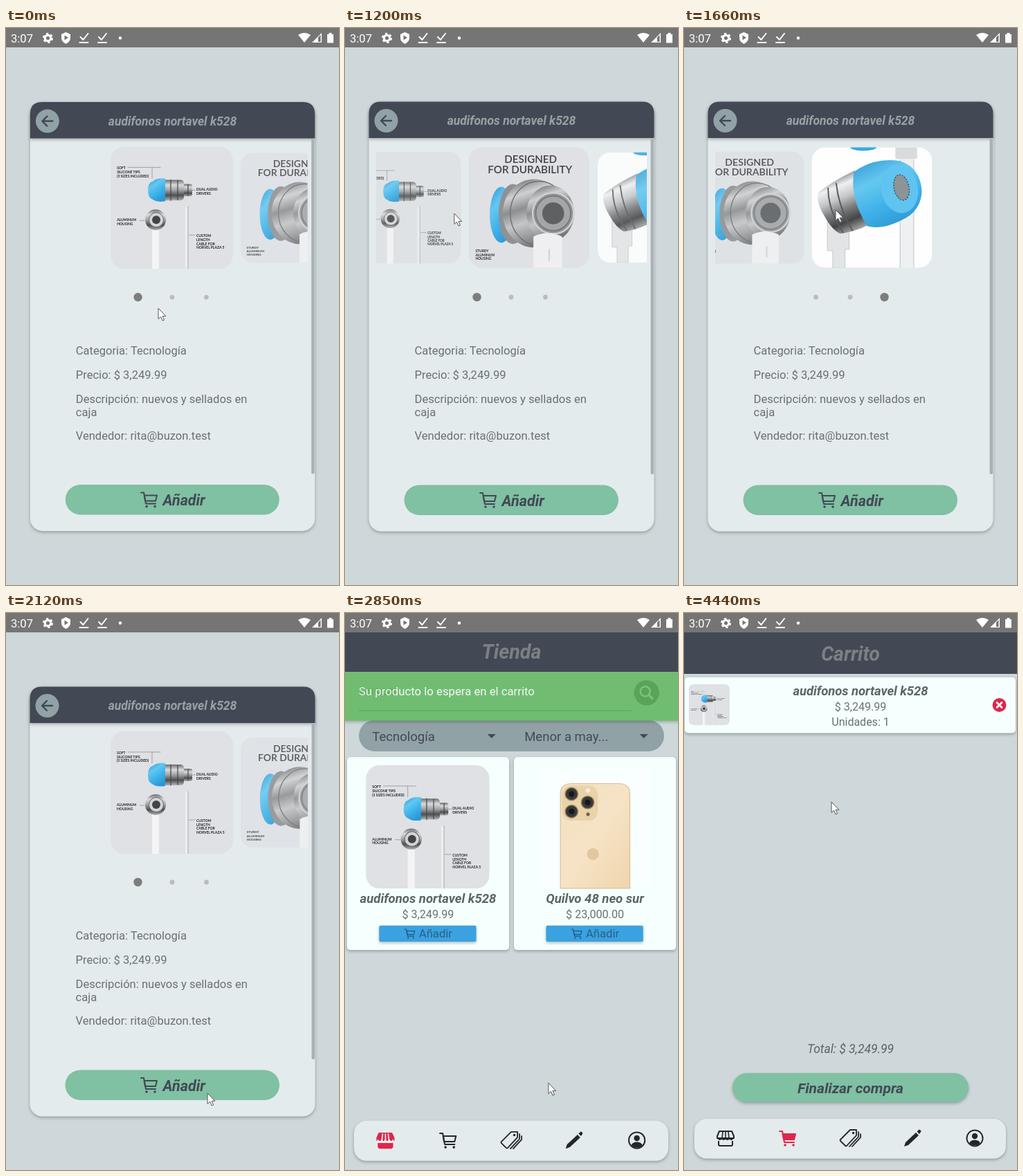
An HTML page that plays this animation: 481 by 805 pixels, repeating every 4.51 s.

```html
<!DOCTYPE html>
<html lang="es">
<head>
<meta charset="utf-8">
<style>
html, body { margin: 0; width: 100%; height: 100%; overflow: hidden; background: #ced7d9; }
svg { display: block; width: 100vw; height: 100vh; }
text { font-family: Roboto, sans-serif; white-space: pre; }
.bi { font-weight: 700; font-style: italic; }
.mid { text-anchor: middle; }
.tiny { font: 700 5px Lato, sans-serif; fill: #222; }
.ad { font: 600 15.4px Lato, sans-serif; fill: #3e3e42; text-anchor: middle; }
.sh { filter: drop-shadow(0 2px 2px #0004); }
</style>
</head>
<body>
<script>
const LOOP = 4510, STEP = 66.32;
const PRODUCT = 'audifonos nortavel k528', PRICE = '$ 3,249.99';
const DARK = '#424954', GREY = '#6a7074', PANEL = '#e4ebec', PILL = '#91a2a6', MINT = '#80c0a3', RED = '#e0264a', WHITE = '#f5fffd';

const text = (x, y, size, fill, str, cls = '') =>
  `<text x="${x}" y="${y}" font-size="${size}" fill="${fill}" class="${cls}">${str}</text>`;
const rect = (x, y, w, h, r, fill, cls = '') =>
  `<rect x="${x}" y="${y}" width="${w}" height="${h}" rx="${r}" fill="${fill}" class="${cls}"/>`;
const circle = (x, y, r, fill, more = '') => `<circle cx="${x}" cy="${y}" r="${r}" fill="${fill}" ${more}/>`;
const oval = (x, y, rx, ry, fill, more = '') => `<ellipse cx="${x}" cy="${y}" rx="${rx}" ry="${ry}" fill="${fill}" ${more}/>`;
const path = (d, fill, more = '') => `<path d="${d}" fill="${fill}" ${more}/>`;
const line = (d, color, width = 1) => path(d, 'none', `stroke="${color}" stroke-width="${width}" stroke-linecap="round" stroke-linejoin="round"`);
const notes = (x, y, ...rows) => rows.map((s, i) => `<text x="${x}" y="${y + i * 5.7}" class="tiny">${s}</text>`).join('');
const use = (id, x, y, s = 1) => `<use href="#${id}" transform="translate(${x} ${y}) scale(${s})"/>`;
const grad = (id, dir, ...stops) => `<linearGradient id="${id}" ${dir}>` +
  stops.map((c, i) => `<stop offset="${i / (stops.length - 1)}" stop-color="${c}"/>`).join('') + '</linearGradient>';

// Icons are drawn around their own centre.
const icons = {
  cart: (c, fill = 'none') => line('M-12 -10H-8L-5 6H9', c, 2) +
    path('M-7.4 -6H11L9 2H-6Z', fill, `stroke="${c}" stroke-width="2" stroke-linejoin="round"`) +
    circle(-4, 10, 1.8, c) + circle(8, 10, 1.8, c),
  store: (c, fill) => path('M-9 -10H9L12 -3V0H-12V-3Z', fill, `stroke="${c}" stroke-width="2" stroke-linejoin="round"`) +
    line('M-4 -9L-5 0M4 -9L5 0M0 -9V0', fill === 'none' ? c : WHITE, 1.6) +
    line('M-11 0q2.7 4 5.5 0q2.7 4 5.5 0q2.7 4 5.5 0q2.7 4 5.5 0', fill === 'none' ? c : WHITE, 1.8) +
    path('M-10 4V9Q-10 11 -8 11H8Q10 11 10 9V4', fill, `stroke="${c}" stroke-width="2"`),
  tags: c => line('M-14 2L0 -12H9V-4L-5 11Q-6 12 -7 11L-14 4Q-15 3 -14 2ZM12 -9V-2L-1 12M15 -6V-1L3 12', c, 1.8) + circle(4.5, -7.5, 1.7, c),
  pencil: c => path('M-12 12L-10 6L5 -8L9 -4L-6 10ZM6.5 -9.5L9 -12Q10 -13 11.5 -11.5Q13 -10 12 -9L10 -6Z', c),
  person: c => circle(0, 0, 11.5, 'none', `stroke="${c}" stroke-width="2"`) + circle(0, -3, 4.2, c) +
    path('M-8 7Q-6 2.5 0 2.5T8 7Q5 10.5 0 10.5T-8 7Z', c)
};
const icon = (name, x, y, s, ...args) => `<g transform="translate(${x} ${y}) scale(${s})">${icons[name](...args)}</g>`;

const defs = `<defs>
${grad('metal', 'x1="0" y1="0" x2="0" y2="1"', '#6c6e70', '#d9dadb', '#a0a2a4', '#4d4f51', '#b0b2b4')}
${grad('steel', 'x1=".3" y1="0" x2=".6" y2="1"', '#77797b', '#cfd0d1', '#8b8d8f', '#c4c5c6', '#98999b', '#646668')}
${grad('barrel', 'x1=".2" y1=".1" x2=".55" y2="1"', '#6f7173', '#f0f0f1', '#c5c6c8', '#77797b', '#3f4143', '#a6a8aa')}
${grad('blue', 'x1=".1" y1="0" x2=".6" y2="1"', '#2f9bd6', '#63c7f2', '#3cb2ea', '#2b98d4')}
${grad('gold', 'x1="0" y1="0" x2="1" y2="1"', '#f4dfbf', '#f6e3c6', '#efd5ab')}
<clipPath id="round"><rect width="177" height="177" rx="20"/></clipPath>
<clipPath id="window"><rect x="45" y="160" width="391" height="200"/></clipPath>
<g id="slide0" clip-path="url(#round)">${rect(0, 0, 177, 177, 0, '#dfe1e5')}
  ${notes(9, 33, 'SOFT', 'SILICONE TIPS', '(3 SIZES INCLUDED)')}${line('M25 30H72M60 30V46M117 63H123M42 107H49M111 128H122', '#777', .6)}
  ${rect(101, 54, 17, 18, 3, 'url(#metal)')}${rect(74, 48, 32, 30, 5, 'url(#metal)')}${line('M87 48V78M97 49V77M112 55V71', '#444', 1.2)}
  ${path('M79 46V79Q66 81 60 76Q54 74 54 63Q54 52 61 50Q67 45 79 46Z', 'url(#blue)')}
  ${notes(124, 64, 'DUAL AUDIO', 'DRIVERS')}${notes(9, 108, 'ALUMINUM', 'HOUSING')}
  ${rect(60, 112, 10, 70, 3, '#f4f4f6')}${circle(65, 106, 15, 'url(#metal)')}${circle(66, 106, 10.5, '#d4d5d6', 'stroke="#666"')}${circle(66, 106, 6, '#444')}
  ${rect(108, 87, 5, 90, 2, '#eeeef1')}${line('M112 87V177', '#999', .9)}
  ${notes(124, 131, 'CUSTOM', 'LENGTH', 'CABLE FOR', 'NORVEL PLAZA 5')}</g>
<g id="slide1" clip-path="url(#round)">${rect(0, 0, 177, 177, 0, '#dfe1e5')}
  <text x="91" y="23" class="ad">DESIGNED</text><text x="90" y="38" class="ad">FOR DURABILITY</text>
  ${oval(48, 99, 17, 41, 'url(#blue)')}${oval(65, 98, 21, 44, '#8d8f91')}
  ${oval(96, 97, 46, 50, 'url(#steel)')}${oval(103, 97, 42, 47, 'none', 'stroke="#6d6f71" stroke-width="1.5"')}
  ${oval(120, 97, 35, 41, 'url(#steel)')}${circle(124, 97, 30, '#8f9193', 'stroke="#cfd0d1" stroke-width="2.5"')}
  ${circle(124, 97, 25.5, '#a2a4a6', 'stroke="#6f7173" stroke-width="1.5"')}${circle(124, 97, 16, '#5b5d5f')}
  ${path('M95 131Q115 121 137 131V177H95Z', '#f0f0f2')}${line('M118 150V166', '#d0d0d2', 2)}
  ${notes(10, 154, 'STURDY', 'ALUMINUM', 'HOUSING')}</g>
<g id="slide2" clip-path="url(#round)">${rect(0, 0, 177, 177, 0, '#fff')}
  ${rect(130, 0, 20, 177, 0, '#f0f1f2')}${line('M130 18V177M150 18V177', '#c5c7c9', 1.2)}${rect(123, 0, 32, 17, 2, '#d9dadc')}
  ${oval(76, 0, 19, 5, '#35a8e2')}
  ${path('M23 102H55V150H49V177H31V152H23Z', '#e3e4e6', 'stroke="#c5c7c9"')}
  ${path('M10 66Q30 50 63 34L94 108Q68 124 42 127Q30 122 18 100Q5 78 10 66Z', 'url(#barrel)')}
  ${line('M24 60Q24 92 46 125M36 53Q40 90 60 122', '#55575a', 2)}
  ${path('M62 36Q92 14 130 20Q160 30 162 65Q160 92 138 104Q105 122 82 116Q56 76 62 36Z', 'url(#blue)')}
  ${oval(129, 61, 27, 36, '#5cc3f0', 'transform="rotate(-12 129 61)"')}
  ${oval(132, 59, 11, 19, '#8a9296', 'stroke="#3d4a50" stroke-width="1.5" stroke-dasharray="2 2" transform="rotate(-12 132 59)"')}</g>
</defs>`;

const backdrop = rect(0, 0, 481, 805, 0, '#ced7d9');
const header = title => rect(0, 0, 481, 88, 0, DARK) + text(240.5, 69, 28.5, '#7b8084', title, 'bi mid');
const nav = active => rect(15, 731, 450, 57.5, 18, PANEL, 'sh') +
  ['store', 'cart', 'tags', 'pencil', 'person'].map((name, i) =>
    icon(name, 60 + 90 * i, 759, 1, i === active ? RED : '#22272b', i === active ? RED : 'none')).join('');

const details = backdrop + `<g id="card">
  ${rect(34.5, 106.5, 412, 621, 18, PANEL, 'sh')}
  ${path('M34.5 159V124Q34.5 106.5 52 106.5H429Q446.5 106.5 446.5 124V159Z', DARK, 'class="sh"')}
  ${circle(59.5, 134, 17, PILL)}${line('M67 134H53M59 127L52 134L59 141', DARK, 2.4)}
  ${text(240.5, 140, 17.5, '#98a1a5', PRODUCT, 'bi mid')}
  <g clip-path="url(#window)">${[0, 1, 2].map(i => `<use href="#slide${i}" class="slide"/>`).join('')}</g>
  ${[0, 1, 2].map(i => circle(190.5 + 49.5 * i, 389, 4, '#777', 'class="dot"')).join('')}
  ${['Categoria: Tecnología', 'Precio: ' + PRICE, 'Descripción: nuevos y sellados en', 'caja', 'Vendedor: rita@buzon.test']
    .map((s, i) => text(100.5, [472, 507, 542, 561, 595][i], 16.6, GREY, s)).join('')}
  ${rect(441.5, 160, 4.5, 485, 2, '#a9b1b4')}
  <g id="add">${rect(85.5, 660.5, 309.5, 43.5, 21.7, MINT)}${icon('cart', 207, 682, 1, DARK)}${text(226.5, 690.5, 21.5, DARK, 'Añadir', 'bi')}</g>
</g>`;

const item = (x, name, price) => rect(x, 210, 232, 276.5, 5, WHITE, 'sh') +
  text(x + 116, 418.5, 18.4, '#5d6468', name, 'bi mid') + text(x + 116, 441, 16, GREY, price, 'mid') +
  rect(x + 46, 451.5, 139, 23, 2, '#3aa2e0', 'sh') + icon('cart', x + 90, 463, .63, '#23597f') + text(x + 103, 469, 16.5, '#28618a', 'Añadir');

const shop = backdrop + `<g id="zoom">${header('Tienda')}
  ${text(22, 122, 18, GREY, 'Buscar')}${rect(22, 143, 390, 1, 0, DARK)}
  ${circle(434, 118, 18, DARK)}${circle(432, 116, 7, 'none', 'stroke="#fff" stroke-width="2.5"')}${line('M437 121L442 126', '#fff', 3)}
  ${rect(22, 157, 437, 45, 22.5, PILL)}
  ${text(41, 187, 18.4, DARK, 'Tecnología')}${text(259, 187, 18.4, DARK, 'Menor a may...')}
  ${path('M206 177H218L212 183ZM424 177H436L430 183Z', DARK)}
  ${item(5, PRODUCT, PRICE)}${use('slide0', 32, 221.5)}
  ${item(244, 'Quilvo 48 neo sur', '$ 23,000.00')}
  ${rect(280, 222, 160, 176, 0, '#f9fffe')}
  ${path('M310.5 398V264Q310.5 248 326 248H395Q410 248 410 264V398Z', 'url(#gold)', 'stroke="#d9c196" stroke-width="1.2"')}
  ${rect(313, 251, 51, 50, 13, '#ead2a9')}
  ${[[326.5, 263], [326.5, 288], [349.5, 275]].map(([x, y]) => circle(x, y, 9, '#3a3835', 'stroke="#8d7c60" stroke-width="1.5"') + circle(x, y, 4, '#15181d')).join('')}
  ${circle(350, 258, 3, '#fff3dc')}${circle(350, 292, 2.5, '#6e6350')}${circle(357, 349, 8.5, '#e3c89d')}
  ${nav(0)}</g>`;

const toast = rect(0, 88, 481, 70, 0, '#5cb85c', 'sh') + text(22, 122, 16.6, '#fff', 'Su producto lo espera en el carrito');

const basket = backdrop + header('Carrito') + rect(1, 93, 478, 80.5, 5, WHITE, 'sh') + use('slide0', 7, 103, 1 / 3) +
  text(255, 119, 18.4, '#5d6468', PRODUCT, 'bi mid') + text(255, 141, 16, GREY, PRICE, 'mid') + text(255, 162.5, 16, GREY, 'Unidades: 1', 'mid') +
  circle(455.5, 133, 10, RED) + line('M452 129.5L459 136.5M459 129.5L452 136.5', '#fff', 2.6) +
  `<g font-style="italic">${text(240.5, 636, 17.5, '#5d6468', 'Total: ' + PRICE, 'mid')}</g>` +
  rect(70, 665, 341, 42, 21, MINT, 'sh') + text(240.5, 693.5, 21, DARK, 'Finalizar compra', 'bi mid') + nav(1);

const status = rect(0, 0, 481, 28, 0, '#757575') + text(7, 20.5, 16.6, '#fff', '3:07') +
  circle(60.5, 14.5, 4.2, 'none', 'stroke="#fff" stroke-width="3.2"') +
  circle(60.5, 14.5, 6.5, 'none', 'stroke="#fff" stroke-width="2" stroke-dasharray="3.4 3.4"') +
  path('M86.5 6L93 9V14Q93 20 86.5 23Q80 20 80 14V9ZM84.5 10.5V17.5L90 14Z', '#fff', 'fill-rule="evenodd"') +
  [112.5, 139].map(x => line(`M${x - 5} 13L${x - 1} 17L${x + 6} 8M${x - 6} 21H${x + 6}`, '#fff', 2)).join('') +
  circle(165, 14.5, 2.2, '#fff') + path('M422 10Q431 4 440 10L431 21Z', '#fff') +
  path('M456 7V21H442ZM451 13.5V20H454.5V10Z', '#fff', 'fill-rule="evenodd"') + path('M464 9H466.5V7H470.5V9H473V21.5H464Z', '#fff');

const pointer = path('M0 0V15.5L3.6 12.3L6.2 18L8.6 17L6.1 11.4H10.8Z', '#fff', 'stroke="#555" stroke-width="1"');

document.body.innerHTML = `<svg viewBox="0 0 481 805" preserveAspectRatio="none">${defs}
  <g id="shop">${shop}</g><g id="basket">${basket}</g><g id="toast">${toast}</g><g id="details">${details}</g>
  ${status}<g id="pointer">${pointer}</g></svg>`;

const $ = id => document.getElementById(id);
const set = (el, attrs) => { for (const k in attrs) el.setAttribute(k, attrs[k]); };
const show = (id, on) => { $(id).style.display = on ? '' : 'none'; };
const zoom = s => `translate(240.5 417) scale(${s}) translate(-240.5 -417)`;
const slides = [...document.querySelectorAll('.slide')], dots = [...document.querySelectorAll('.dot')];

// Linear interpolation over [time, value, ...] keys.
function at(t, keys, k = 1) {
  const i = keys.findIndex(key => key[0] > t);
  if (i < 0) return keys[keys.length - 1][k];
  if (!i) return keys[0][k];
  const a = keys[i - 1], b = keys[i];
  return a[k] + (b[k] - a[k]) * (t - a[0]) / (b[0] - a[0]);
}

const cursor = [[0, 220, 405], [130, 221, 400], [470, 262, 290], [730, 253, 276], [930, 217, 276], [1130, 150, 270], [1390, 182, 262],
  [1600, 190, 262], [1760, 270, 264], [2120, 291, 694], [2380, 293, 690], [2720, 293, 690], [2850, 294, 679], [3190, 270, 700],
  [3650, 131, 762], [3850, 140, 758], [4380, 211, 290], [4440, 213, 273]];
const scroll = [[730, 0], [930, 35.5], [1130, 102], [1390, 309], [1530, 358], [1600, 358], [1760, 270], [1990, 0]];
const page = [[1290, 0], [1390, .42], [1470, 1], [1600, 2], [1760, 2], [2050, 0]];

function draw(time) {
  const t = Math.floor(time % LOOP / STEP + .06) * STEP;
  show('details', t < 2800);
  show('shop', t > 2640 && t < 3840);
  show('basket', t >= 3840);

  const pos = at(t, scroll), active = at(t, page);
  slides.forEach((el, i) => {
    const off = Math.min(1, Math.abs(i - pos / 179)), s = 1 - .1 * off;
    set(el, { transform: `translate(${239.5 - pos + 179 * i} 259.5) scale(${s}) translate(-88.5 -88.5)`, opacity: 1 - .15 * off });
  });
  dots.forEach((el, i) => {
    const w = Math.max(0, 1 - Math.abs(active - i));
    set(el, { r: 3.4 + 2.8 * w, opacity: .4 + .55 * w });
  });
  set($('card'), { transform: zoom(t < 60 ? .998 : 1) });
  set($('add'), { opacity: at(t, [[2150, 1], [2255, .5], [2380, 1]]) });
  set($('details'), { opacity: at(t, [[2660, 1], [2790, 0]]), transform: zoom(at(t, [[2660, 1], [2800, .9]])) });

  const grow = zoom(at(t, [[2700, 1.06], [2850, 1.009], [2950, 1]]));
  set($('zoom'), { transform: grow });
  set($('toast'), { transform: grow, opacity: at(t, [[2700, 0], [2850, .82], [2950, 1], [3850, 1], [4050, 0]]) });
  set($('pointer'), { transform: `translate(${at(t, cursor)} ${at(t, cursor, 2)})` });
}

let start;
function tick(now) {
  start ??= now;
  draw(now - start);
  requestAnimationFrame(tick);
}
draw(0);
requestAnimationFrame(tick);
</script>
</body>
</html>
```
